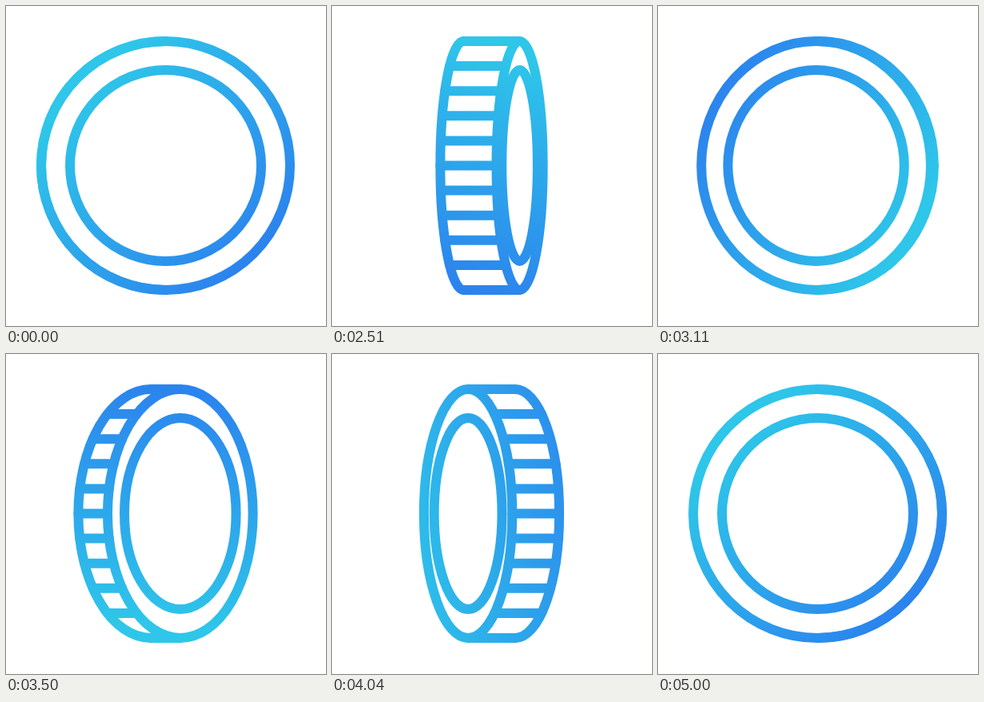
An HTML page with a canvas for the animation above (5030 ms loop, 400 px wide and 400 px high).

```html
<!DOCTYPE html>
<html>
<head>
<meta charset="utf-8">
<title>Spinning coin</title>
<style>
html, body { margin: 0; height: 100%; overflow: hidden; background: #fff; }
canvas { display: block; }
</style>
</head>
<body>
<canvas id="stage" width="400" height="400"></canvas>
<script>
const ctx = document.getElementById('stage').getContext('2d');
const { PI, sin, cos, abs, floor, min, max } = Math;
const LOOP = 5030, START = 2000, STEP = 30, STEPS = 100;
const HALFWAY = 0.41; // share of the spin spent on the first half turn
const C = 199.5, OUTER = 155.5, INNER = 119.5, RUNGS = 5, THICKNESS = 37.5;

// Half a turn that lingers while the coin is edge-on
const halfTurn = u => PI * (u + 0.05 * sin(2 * PI * u));

// Steady first half turn, then a second one that slows to a stop
function turn(p) {
  if (p < HALFWAY) return halfTurn(p / HALFWAY);
  const rest = (1 - p) / (1 - HALFWAY);
  return PI + halfTurn(1 - rest ** 1.75);
}

// Half of the visible rim; tilt runs from 0 face-on to 1 edge-on
const rim = tilt => THICKNESS * sin(PI / 2 * tilt ** 1.4) ** 2;

// Gradient across the stage, turning once with an ease in and out
function shading(p) {
  const u = p ** 0.75;
  const angle = PI / 4 + 2 * PI * u * u * (3 - 2 * u);
  const dx = cos(angle), dy = sin(angle);
  const fill = ctx.createLinearGradient(
    C - 140 * dx, C - 140 * dy, C + 190 * dx, C + 190 * dy);
  fill.addColorStop(0, '#2ec6e9');
  fill.addColorStop(1, '#2b7cee');
  return fill;
}

function arc(x, rx, ry, from = 0, to = 2 * PI) {
  ctx.beginPath();
  ctx.ellipse(x, C, rx, ry, 0, from, to);
  ctx.stroke();
}

function draw(p) {
  const angle = turn(p);
  const squeeze = abs(cos(angle));
  const side = Math.tan(angle) < 0 ? -1 : 1;
  const depth = side * rim(Math.acos(squeeze) / (PI / 2));

  ctx.clearRect(0, 0, 400, 400);
  ctx.lineWidth = 12;
  ctx.lineCap = 'round';
  ctx.strokeStyle = shading(p);

  arc(C + depth, OUTER * squeeze, OUTER);
  arc(C + depth, INNER * squeeze, INNER);

  // Far rim and the ridges along the edge
  const from = side * PI / 2;
  arc(C - depth, OUTER * squeeze, OUTER, from, from + PI);
  ctx.beginPath();
  for (let k = -RUNGS; k <= RUNGS; k++) {
    const y = C + OUTER * k / RUNGS;
    const x = C - side * OUTER * squeeze * Math.sqrt(1 - (k / RUNGS) ** 2);
    ctx.moveTo(x - depth, y);
    ctx.lineTo(x + depth, y);
  }
  ctx.stroke();
}

function tick() {
  const t = performance.now() % LOOP;
  const step = floor((t - START) / STEP);
  draw(max(0, min(STEPS, step)) / STEPS);
  requestAnimationFrame(tick);
}
tick();
</script>
</body>
</html>
```
